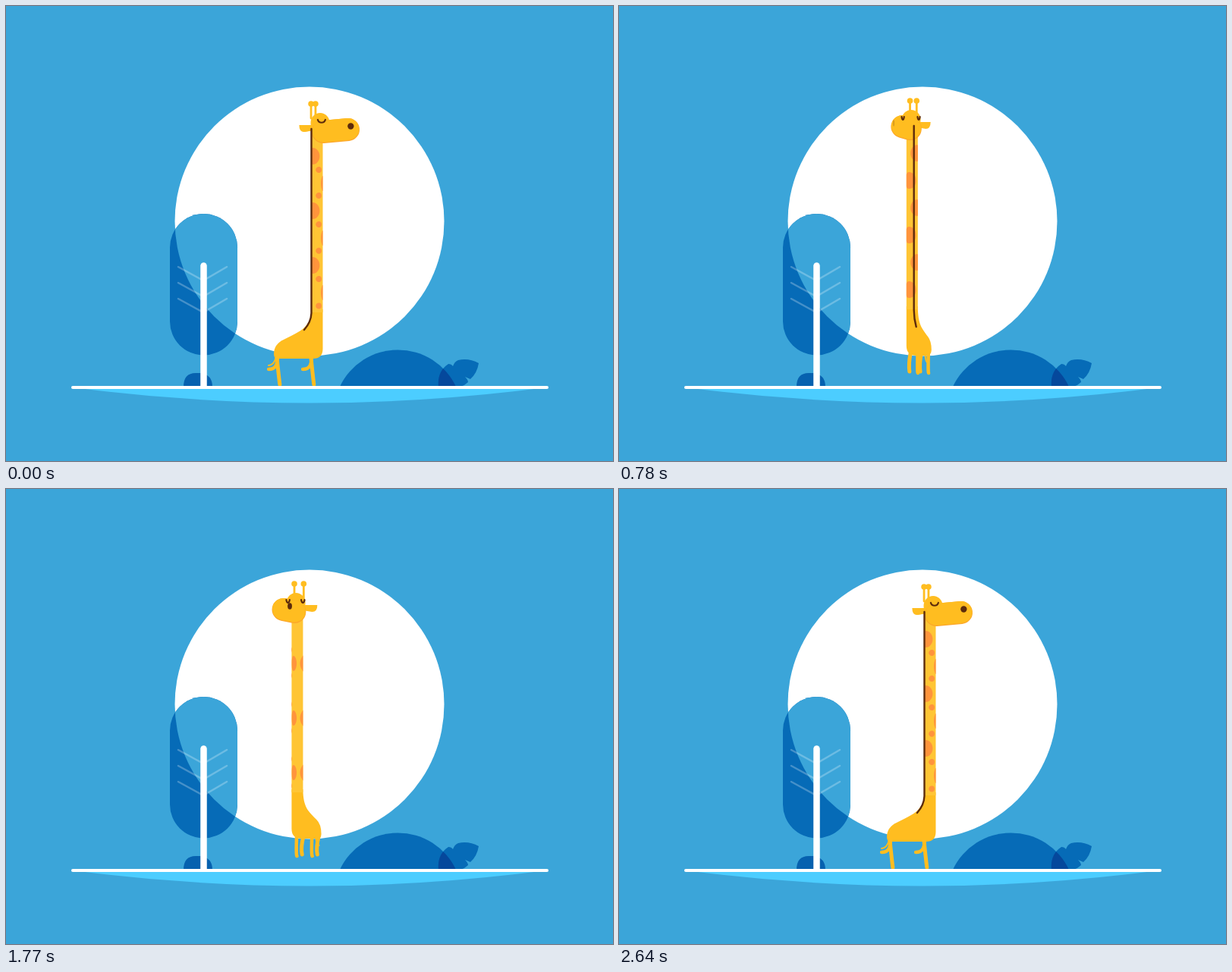
An HTML page with a canvas for the animation above (2670 ms loop, 800 by 600 pixels).

```html
<!DOCTYPE html>
<html lang="en">
<head>
<meta charset="utf-8">
<title>Spinning giraffe</title>
<style>
  html, body { margin: 0; width: 100%; height: 100%; overflow: hidden; background: #3ba5d9; }
  svg, canvas { position: absolute; left: 0; top: 0; display: block; }
</style>
</head>
<body>
<svg width="800" height="600" viewBox="0 0 800 600">
  <defs>
    <clipPath id="sunClip"><circle cx="400" cy="284" r="177.5"/></clipPath>
    <clipPath id="hillClip"><path d="M440 502A84.5 84.5 0 0 1 593 502Z"/></clipPath>
    <path id="leaf" d="M570 502Q568 482 583 472Q587 472 589 475Q591 469 596 467Q610 464 623 471Q621 484 612 492L605 489Q609 493 609 496Q605 500 599 502Z"/>
    <rect id="crown" x="216" y="274" width="89" height="186.500" rx="44.500"/>
  </defs>
  <circle cx="400" cy="284" r="177.500" fill="#fff"/>
  <use href="#crown" fill="#066bb7"/>
  <use href="#crown" fill="#3ba5d9" clip-path="url(#sunClip)"/>
  <path d="M227 344L260 362L291 344M227 365L260 383L291 365M227 386L260 404L291 386" fill="none" stroke="#fff" stroke-opacity=".25" stroke-width="2.500" stroke-linecap="round"/>
  <path d="M234 502Q234 484 250 484H256Q272 486 272 502Z" fill="#0661af"/>
  <path d="M260.500 342.500V502" stroke="#fff" stroke-width="8.500" stroke-linecap="round"/>
  <path d="M440 502A84.500 84.500 0 0 1 593 502Z" fill="#066bb7"/>
  <use href="#leaf" fill="#066bb7"/>
  <use href="#leaf" fill="#05489c" clip-path="url(#hillClip)"/>
  <path d="M96 504Q400 543 704 504Z" fill="#4ccdff"/>
</svg>
<canvas id="stage" width="800" height="600"></canvas>
<svg width="800" height="600"><path d="M88 503H713" stroke="#fff" stroke-width="4" stroke-linecap="round"/></svg>
<script>
const ctx = document.getElementById('stage').getContext('2d');
const STEP = 30, STEPS = 88, HOPS = 8, AXIS = 392;
const SKIN = '#ffbd20', NECK = '#ffc535', SHADE = '#fca62a', SPOT = '#ff943c', DARK = '#5c2b0c';
const RAD = Math.PI / 180;

// [phase, value] keys over one hop
const RISE = [[0, 0], [.17, 13], [.27, 10], [.364, -4], [.5, -15], [.727, -20], [.909, -11], [1, 0]];
const REACH = [[0, 36], [.17, 23], [.27, 24], [.364, 23], [.5, 28], [.727, 34], [.909, 34], [1, 36]];
const TUCK_X = [[0, -11], [.27, -2], [.364, -1], [.727, -8], [.909, -10], [1, -11]];
const TUCK_Y = [[0, 14], [.27, 20], [.364, 23], [.727, 14], [.909, 13], [1, 14]];

// Smooth curve through the keys
function sample(keys, p) {
  const n = keys.length - 1;
  let i = 0;
  while (i < n - 1 && p >= keys[i + 1][0]) i++;
  const slope = k => {
    const a = k ? keys[k - 1] : [keys[n - 1][0] - 1, keys[n - 1][1]];
    const b = k < n ? keys[k + 1] : [keys[1][0] + 1, keys[1][1]];
    return (b[1] - a[1]) / (b[0] - a[0]);
  };
  const [x0, y0] = keys[i], [x1, y1] = keys[i + 1];
  const w = x1 - x0, s = (p - x0) / w, r = 1 - s;
  return y0 * (1 + 2 * s) * r * r + y1 * (3 - 2 * s) * s * s
    + w * s * r * (slope(i) * r - slope(i + 1) * s);
}

function dot(x, y, rx, ry, color) {
  ctx.fillStyle = color;
  ctx.beginPath();
  ctx.ellipse(x, y, rx, ry, 0, 0, 2 * Math.PI);
  ctx.fill();
}

function line(width, color, draw) {
  ctx.lineWidth = width;
  ctx.strokeStyle = color;
  ctx.beginPath();
  draw();
  ctx.stroke();
}

function drawLegs(phase, at) {
  const len = sample(REACH, phase), bend = Math.max(0, 36 - len);
  const tx = sample(TUCK_X, phase), ty = sample(TUCK_Y, phase), cos = at(1, 0);
  for (const u of [-35, 10]) {
    const up = AXIS + at(u, -5), down = AXIS + at(u, 5);
    line(4.5, SKIN, () => {
      ctx.moveTo(up, 462);
      ctx.quadraticCurveTo(up + 2 * cos, 465 + ty, up + tx * cos, 465 + ty);
    });
    line(5, SKIN, () => {
      ctx.moveTo(down, 462);
      ctx.quadraticCurveTo(down + (2 + bend * .5) * cos, 465 + len * .5, down + 4 * cos, 463 + len);
    });
  }
  line(2, SKIN, () => {
    ctx.moveTo(AXIS + at(-36, 0), 463);
    ctx.quadraticCurveTo(AXIS + at(-39, 0), 474, AXIS + at(-46, 0), 474);
  });
}

function drawBody(at) {
  const rear = at(-46, 0);
  const flank = (side, back) => {
    const ext = Math.max(7.5, side * rear + 11), e = ext - 7.5;
    const corner = 13 - Math.min(7, e * .3);
    const pts = [[7.5, 400], [7.5, 425], [7.5 + .35 * e, 430], [7.5 + .74 * e, 440],
      [ext, 446], [ext, 465 - corner], [ext, 465], [ext - corner, 465]]
      .map(([x, y]) => [side * x, y]);
    if (back) pts.reverse();
    const [a, b, c, d, f, g, h, k] = pts;
    if (back) {
      ctx.lineTo(...a);
      ctx.quadraticCurveTo(...b, ...c);
      ctx.quadraticCurveTo(...d, ...f);
      ctx.bezierCurveTo(...g, ...h, ...k);
    } else {
      ctx.moveTo(...a);
      ctx.bezierCurveTo(...b, ...c, ...d);
      ctx.quadraticCurveTo(...f, ...g);
      ctx.quadraticCurveTo(...h, ...k);
    }
  };
  ctx.fillStyle = SKIN;
  ctx.beginPath();
  flank(1, false);
  flank(-1, true);
  ctx.fill();
}

// A round patch wrapped on the neck, cut at its visible edges
function drawSpot(turn, y, r, spread) {
  const mid = ((turn + 270) % 360 + 360) % 360 - 270;
  if (mid - spread > 0 || mid + spread < -180) return;
  ctx.fillStyle = SPOT;
  ctx.beginPath();
  for (let k = 0; k < 32; k++) {
    const t = k * Math.PI / 16;
    const a = Math.max(-180, Math.min(0, mid + spread * Math.cos(t)));
    ctx.lineTo(7.5 * Math.cos(a * RAD), y + r * Math.sin(t));
  }
  ctx.fill();
}

function drawNeck(deg) {
  ctx.fillStyle = NECK;
  ctx.fillRect(-7.5, 165, 15, 239);
  for (let k = 0; k < 3; k++) {
    const y = 72 * k;
    drawSpot(deg - 140, 198 + y, 11, 75);
    drawSpot(deg + 130, 234 + y, 11, 75);
    drawSpot(deg - 15, 234 + y, 10, 35);
    drawSpot(deg - 73, 216 + y, 4, 33);
    drawSpot(deg - 73, 250 + y * 1.01, 4, 33);
  }
}

function drawMane(at) {
  line(2.4, DARK, () => {
    const x = at(-7.5, 0);
    ctx.moveTo(x, 162);
    ctx.lineTo(x, 405);
    ctx.quadraticCurveTo(at(-8, 0), 417, at(-17, 0), 427);
  });
}

function drawHead(at, depth) {
  for (const s of [1, -1]) {
    const hx = at(-5 + 2.75 * s, -5.5 * s);
    line(2.8, SKIN, () => { ctx.moveTo(hx, 130); ctx.lineTo(hx, 148); });
    dot(hx, 129, 3.8, 3.8, SKIN);

    const base = at(-5, 5 * s), tip = at(-23, 18 * s);
    ctx.fillStyle = SKIN;
    ctx.beginPath();
    ctx.moveTo(base, 157);
    ctx.lineTo(tip, 157);
    ctx.quadraticCurveTo(tip, 166, tip + (base - tip) * .35, 166);
    ctx.lineTo(base, 164);
    ctx.fill();
  }
  dot(at(4, 0), 154, 12.5, 13, SKIN);
  const muzzle = (width, color, y) => line(width, color, () => {
    ctx.moveTo(at(8, 0), 166 + y);
    ctx.lineTo(at(41, 0), 163 + y);
  });
  muzzle(30, SHADE, 0);
  muzzle(28.8, SKIN, -.7);

  for (const s of [1, -1]) {
    const facing = depth(0, s);
    if (facing < .5) {
      const x = at(5.5, 11 * s), w = 5 * Math.max(.25, Math.abs(facing));
      line(2.2, DARK, () => {
        ctx.moveTo(x - w, 150);
        ctx.bezierCurveTo(x - w * .7, 155, x + w * .7, 155, x + w, 150);
      });
    }
    const open = -depth(3, 11 * s) / 11;
    if (open > .05) dot(at(44, 11 * s), 158.5, 4.2 * Math.min(1, open), 4.2, DARK);
  }
}

function draw(step) {
  const turn = step / STEPS % 1, phase = turn * HOPS % 1;
  const deg = 360 * turn + 2, cos = Math.cos(deg * RAD), sin = Math.sin(deg * RAD);
  // u points forward, v to the animal's left
  const at = (u, v) => u * cos - v * sin;
  const depth = (u, v) => u * sin + v * cos;

  ctx.clearRect(0, 0, 800, 600);
  ctx.lineCap = ctx.lineJoin = 'round';
  ctx.save();
  ctx.translate(0, sample(RISE, phase));
  drawLegs(phase, at);
  ctx.translate(AXIS + 18 * cos, 0);
  if (sin < 0) drawMane(at);
  drawBody(at);
  drawNeck(deg);
  drawHead(at, depth);
  if (sin >= 0) drawMane(at);
  ctx.restore();
}

function tick() {
  draw(Math.floor(performance.now() / STEP) % (STEPS + 1));
  requestAnimationFrame(tick);
}
tick();
</script>
</body>
</html>
```
